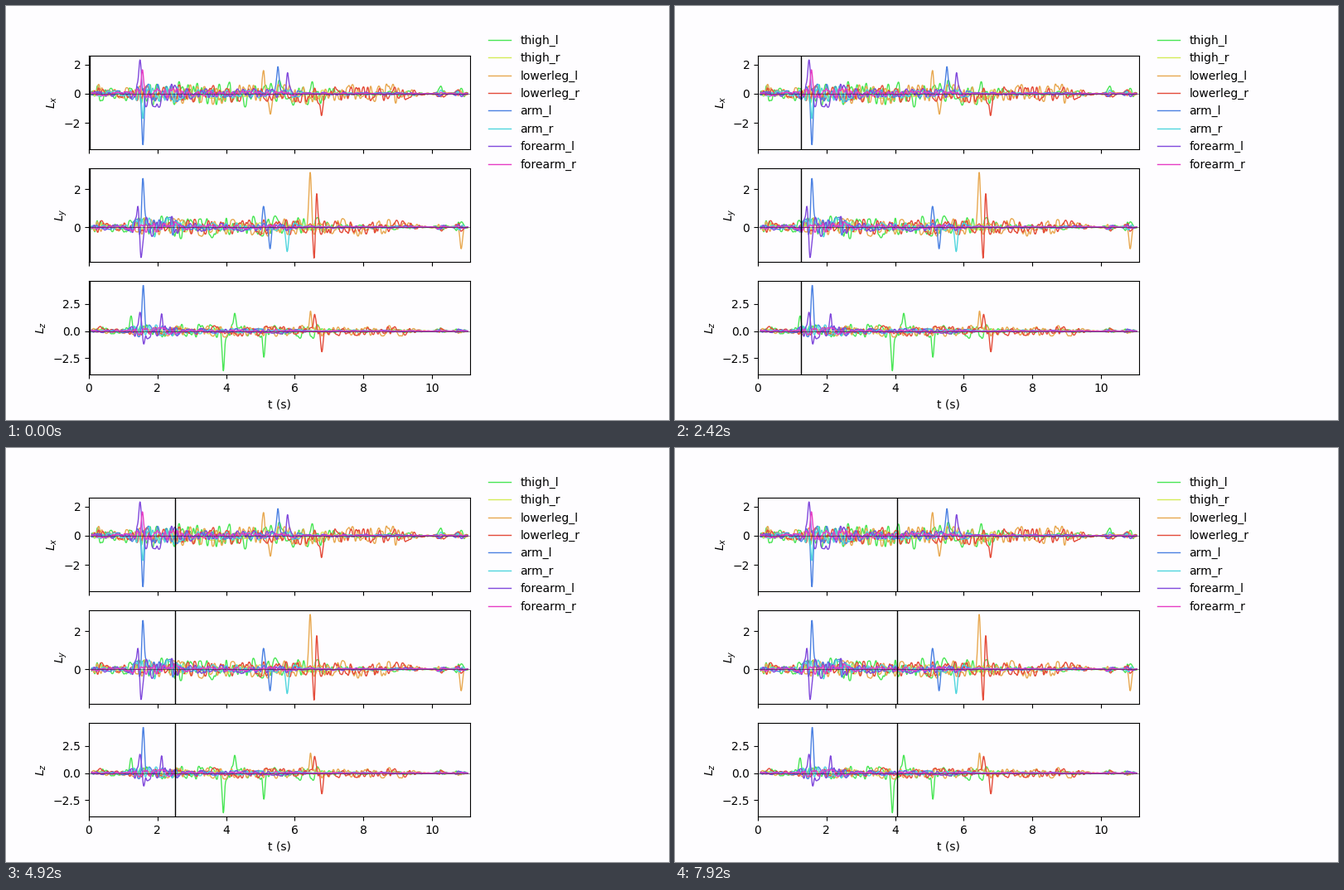
Animation of 800x500 px, one loop 8 s. Source, as a matplotlib script:

```python
import numpy as np
import matplotlib.pyplot as plt
from matplotlib.animation import FuncAnimation

STEPS = 96        # cursor positions in one loop
SUB = 2           # drawn frames per cursor position
LOOP_MS = 8000
T_END = 11.11
BG = "#fefdff"
plt.rcParams["font.family"] = "DejaVu Sans"

# colour, strength of the restless motion, time at which it dies down
LIMBS = {
    "thigh_l": ("#48e654", .6, 7.0),
    "thigh_r": ("#d4ec58", .25, 7.0),
    "lowerleg_l": ("#e8a850", .48, 9.4),
    "lowerleg_r": ("#e44a38", .42, 9.4),
    "arm_l": ("#4a80e2", .26, 6.2),
    "arm_r": ("#50d6de", .28, 6.2),
    "forearm_l": ("#8048dc", .32, 6.0),
    "forearm_r": ("#e63cc4", .16, 6.0),
}

# label, y range, restlessness, outstanding peaks: (limb, time, height)
PANELS = [
    ("$L_x$", (-3.83, 2.62), 1.0, [
        ("arm_l", 1.575, -3.54), ("forearm_l", 1.49, 2.33),
        ("forearm_r", 1.56, 1.65), ("arm_r", 1.57, -1.7),
        ("lowerleg_l", 5.09, 1.6), ("lowerleg_l", 5.29, -1.4),
        ("arm_l", 5.51, 1.86), ("forearm_l", 5.79, 1.45),
        ("lowerleg_r", 6.78, -1.5)]),
    ("$L_y$", (-1.85, 3.125), .68, [
        ("arm_l", 1.575, 2.6), ("forearm_l", 1.43, 1.15),
        ("forearm_l", 1.52, -1.65), ("arm_l", 5.09, 1.1),
        ("arm_l", 5.28, -1.15), ("arm_r", 5.78, -1.3),
        ("lowerleg_l", 6.45, 2.9), ("lowerleg_r", 6.575, -2.1),
        ("lowerleg_r", 6.63, 2.2), ("lowerleg_l", 10.85, -1.15)]),
    ("$L_z$", (-3.99, 4.65), .75, [
        ("arm_l", 1.585, 4.25), ("forearm_l", 1.49, 1.75),
        ("forearm_l", 1.6, -1.2), ("forearm_l", 2.12, 1.6),
        ("thigh_l", 1.23, 1.4), ("thigh_l", 3.92, -3.65),
        ("thigh_l", 4.25, 1.65), ("thigh_l", 5.1, -2.4),
        ("lowerleg_l", 6.46, 1.85), ("lowerleg_r", 6.58, 1.55),
        ("lowerleg_r", 6.79, -1.9)]),
]

t = np.arange(.08, 11.05, .01)
rng = np.random.default_rng(12)


def bump(at, width):
    return np.exp(-((t - at) / width) ** 2 / 2)


def gate(start, end, soft=.12):
    return (np.tanh((t - start) / soft) - np.tanh((t - end) / soft)) / 2


def activity(limb, end):
    late = .5 * (bump(10.25, .09) + bump(10.8, .1))
    if limb.startswith(("thigh", "lower")):
        moves = .8 * bump(.3, .13) + .3 * gate(.5, 1.2) + .85 * gate(1.2, end, .3)
    else:
        moves = .4 * gate(0, 1.2) + 1.7 * gate(1.2, 2.6) + .65 * gate(2.6, end)
    return moves + late + .15 * gate(end, 9.6) + .05


def restless(width=.026):
    k = np.arange(-20, 21) * .01
    kernel = np.exp(-(k / width) ** 2 / 2)
    raw = np.convolve(rng.normal(size=t.size), kernel, "same")
    return 1.8 * np.tanh(raw / raw.std() / 1.8)


def signal(limb, scale, peaks):
    _, level, end = LIMBS[limb]
    own = [(height, bump(at, .034)) for name, at, height in peaks if name == limb]
    spikes = sum(height * b for height, b in own)
    calm = np.clip(1 - sum(b for _, b in own), 0, 1)
    return spikes + calm * restless() * activity(limb, end) * level * scale


fig, axes = plt.subplots(3, 1, sharex=True, figsize=(8, 5), dpi=100, facecolor=BG)
fig.subplots_adjust(left=.125, right=.7, bottom=.11, top=.88, hspace=.2)

cursors = []
for ax, (label, ylim, scale, peaks) in zip(axes, PANELS):
    ax.set_facecolor(BG)
    for limb, (color, *_) in LIMBS.items():
        ax.plot(t, signal(limb, scale, peaks), color=color, lw=1, label=limb)
    ax.axhline(0, color="k", lw=.5, alpha=.6, zorder=2.5)
    cursors.append(ax.axvline(0, color="k", lw=1, zorder=3))
    ax.set_ylim(*ylim)
    ax.set_ylabel(label)
axes[0].set_xlim(0, T_END)
axes[2].set_xlabel("t (s)")
axes[0].legend(loc="center left", bbox_to_anchor=(1.02, .5), frameon=False,
               labelspacing=.526)


def update(i):
    step = (i + 1) // SUB % STEPS
    now = .014 + .0425 * step
    for line in cursors:
        line.set_xdata([now, now])
    return cursors


anim = FuncAnimation(fig, update, frames=STEPS * SUB,
                     interval=LOOP_MS / (STEPS * SUB),
                     repeat=True, repeat_delay=0, blit=False)
plt.show()
```
